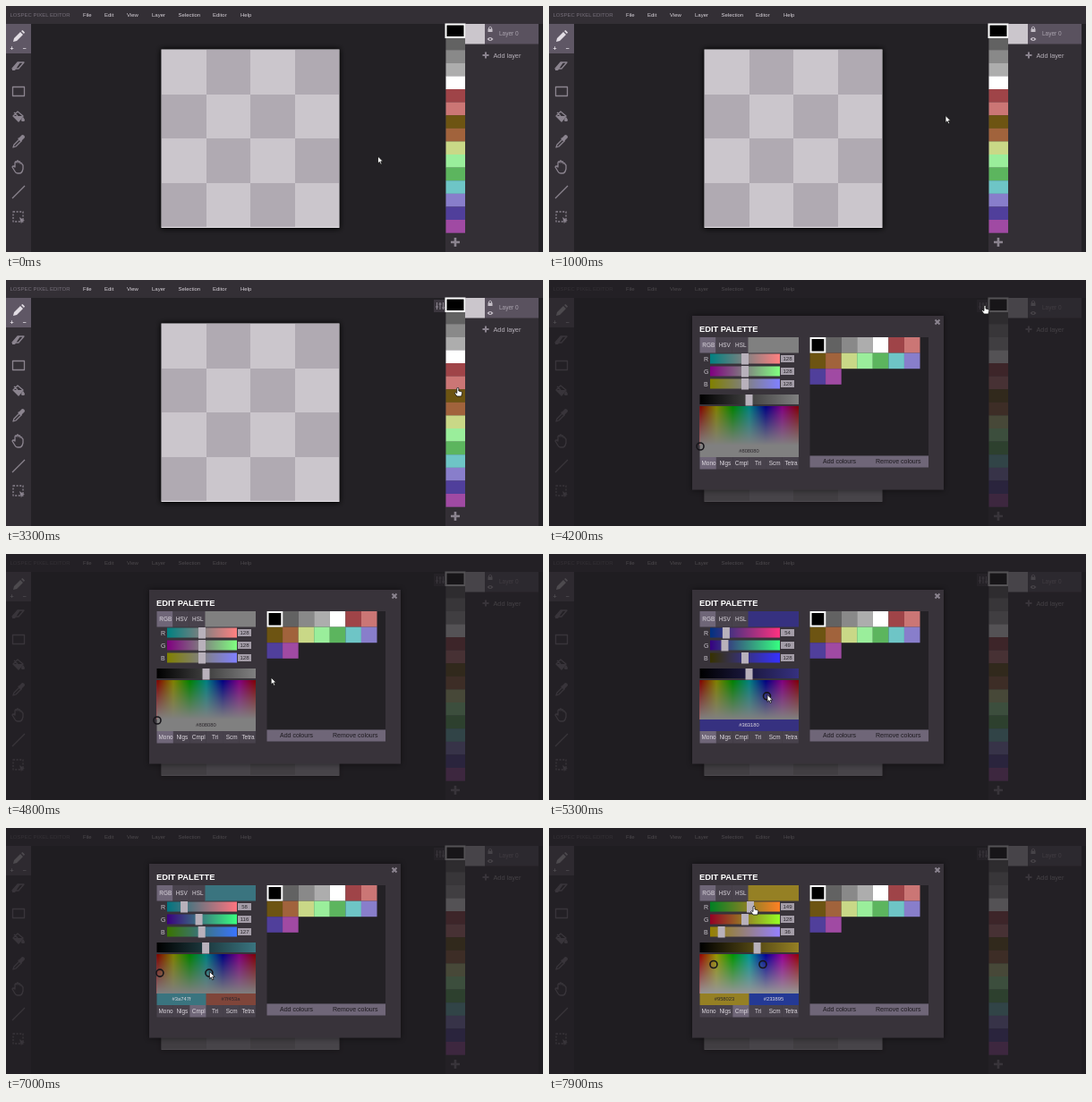
An HTML page that plays this animation: 600x275 px, repeating every 8 s.

```html
<!DOCTYPE html>
<html lang="en">
<head>
<meta charset="utf-8">
<title>Pixel editor palette</title>
<style>
  html, body { margin: 0; width: 100%; height: 100%; overflow: hidden; background: #232125; }
  svg { display: block; width: 600px; height: 275px; font-family: "Liberation Sans", Arial, sans-serif; }
  text { white-space: pre; }
  .icon { fill: none; stroke: #8b848f; stroke-width: 1.3; stroke-linejoin: round; }
  .solid { fill: #8b848f; }
  .mid { text-anchor: middle; }
</style>
</head>
<body>
<svg id="stage" viewBox="0 0 600 275"></svg>
<script>
const LOOP = 8000, STEP = 100, OPEN = 4100, COMPLEMENT = 6200, SLIDE = 7600;
const PANEL = '#332f35', DARK = '#232125', PURPLE = '#6f6678', LIGHT = '#cbc6cc';
const PALETTE = ['#000000', '#626262', '#898989', '#adadad', '#ffffff', '#9f4448', '#cb7675', '#6d5412',
  '#a1633c', '#c9d887', '#9aee9b', '#5cb55e', '#6ec5c6', '#887ecb', '#503f9b', '#a04aa3'];

// Markup helpers
const rect = (x, y, w, h, fill, extra = '') =>
  `<rect x="${x}" y="${y}" width="${w}" height="${h}" fill="${fill}" ${extra}/>`;
const text = (x, y, size, fill, label, extra = '') =>
  `<text x="${x}" y="${y}" font-size="${size}" fill="${fill}" ${extra}>${label}</text>`;
const path = (d, cls = 'icon', extra = '') => `<path d="${d}" class="${cls}" ${extra}/>`;
const gradient = (id, colors, extra = '') => `<linearGradient id="${id}" ${extra}>` +
  colors.map((c, i) => `<stop offset="${i / (colors.length - 1)}" stop-color="${c}"/>`).join('') +
  '</linearGradient>';
const list = (n, draw) => Array.from({ length: n }, (_, i) => draw(i)).join('');
const plus = (x, y, r, w) => path(`M${x - r} ${y}h${2 * r}M${x} ${y - r}v${2 * r}`, 'icon', `style="stroke-width:${w}"`);

const defs = `<defs>
  ${['r', 'g', 'b', 'v'].map(id => gradient('grad-' + id, ['#000', '#000'])).join('')}
  ${gradient('hues', ['#f00', '#ff0', '#0f0', '#0ff', '#00f', '#f0f', '#f00'])}
  <linearGradient id="fade" x2="0" y2="1"><stop stop-color="#fff" stop-opacity="0"/><stop offset="1" stop-color="#fff"/></linearGradient>
  <filter id="blur" x="-20%" y="-20%" width="140%" height="140%"><feGaussianBlur stdDeviation="3"/></filter>
</defs>`;

const menu = rect(0, 0, 600, 20, PANEL) + text(4.5, 12.3, 6, '#77707b', 'LOSPEC PIXEL EDITOR') +
  [['File', 86], ['Edit', 110], ['View', 135], ['Layer', 163], ['Selection', 192.5], ['Editor', 231], ['Help', 262]]
    .map(([label, x]) => text(x, 12.2, 6, '#d8d3da', label)).join('');

const tools = rect(0, 20, 28, 255, PANEL) + rect(0, 20, 28, 33, '#5f5765') +
  path('M8 40l1-4 7-7 3 3-7 7zM17 28l1.500-1 2.500 2.500-1 1.500z', '', 'fill="#e2dde4"') +
  text(4.500, 50, 7, '#e2dde4', '+', 'font-weight="bold"') + text(18.500, 50, 7, '#e2dde4', '−', 'font-weight="bold"') +
  path('M7 70l6-7h7l-6 7z') + path('M7 70l6-7h3l-6 9h-3z', 'solid') +
  path('M7.500 90.500h13v10h-13z') +
  path('M8 123l5-5 6 5-5 6zM9 119l4 4') + path('M8 123h11l-5 6zM19 124q4 5 0 5t0-5', 'solid') +
  path('M8 158l1-3 6-6 2 2-6 6z') + path('M13 148l2-1 3-3q3 0 3 3l-3 3-1 2z', 'solid') +
  path('M10 185l-3-5q1-2 3 0v-5q1-2 2 0v-1q1-2 2 0v1q1-2 2 0v1q2-1 2 1l1 1v4q-1 5-4 5h-2q-2 0-3-2z') +
  path('M7 215L21 201') +
  path('M8 230h11v11h-11z', 'icon', 'stroke-dasharray="2 1.6"') + path('M15 236l6 4-3 .5-1 3z', 'solid');

const board = rect(173, 48, 200, 201, '#000', 'filter="url(#blur)"') + rect(173.500, 48.500, 199, 199.500, '#e4e0e5') +
  list(16, i => {
    const col = i % 4, row = i >> 2;
    return rect(174 + col * 49.5, 49 + row * 49.5, 49.5, 49.5, (col + row) % 2 ? '#b0aab2' : LIGHT, 'shape-rendering="crispEdges"');
  });

const editButton = `<g id="edit">${rect(478, 22, 14, 14, '#3b363e')}` +
  path('M481.500 25v8M485 25v8M488.500 25v8M480 30h3M483.500 27h3M487 31h3', 'icon', 'style="stroke-width:1"') + '</g>';
const side = editButton + rect(491, 20, 109, 255, PANEL) + rect(595, 20, 5, 255, DARK) +
  PALETTE.map((c, i) => rect(491.5, 20 + i * 14.6, 21.5, 14.7, c)).join('') +
  rect(491.500, 20.500, 21, 14.500, '#000', 'stroke="#fff" stroke-width="2"') + plus(502, 264, 5, 2.6) +
  rect(513, 20, 22, 22.5, LIGHT) + rect(535, 20, 60, 22.5, '#5a525f') +
  rect(538.500, 25.500, 5, 3.500, '#c5bfc8') + path('M539.500 26v-2q1.500-2 3 0v2', 'icon', 'style="stroke:#c5bfc8;stroke-width:.9"') +
  path('M537.500 37q3.500-4 7 0q-3.500 4-7 0z', '', 'fill="#c5bfc8"') + '<circle cx="541" cy="37" r="1.100" fill="#5a525f"/>' +
  text(551, 33.3, 6.5, '#aaa3ae', 'Layer 0') + plus(536, 55, 3.5, 2) + text(544.5, 57.7, 7.3, '#b5afb8', 'Add layer');

const tabs = (labels, x, y, h, w, id) => labels.map((label, i) =>
  rect(x + i * w, y, w, h, '#48424c', `id="${id}${i}"`) + text(x + i * w + w / 2 + .8, y + h / 2 + 2.4, 6.4, '#dcd7de', label, 'class="mid"')).join('');
const sliders = ['r', 'g', 'b'].map((c, i) => {
  const y = 88 + i * 14;
  return text(173, y + 2.6, 7, '#c9c4cc', c.toUpperCase()) + rect(180, y - 5.5, 78, 11, `url(#grad-${c})`) +
    rect(0, y - 6, 8, 12.5, '#b8b1bb', `id="knob-${c}"`) + rect(259, y - 4, 15, 8, '#a49da8') +
    text(266.5, y + 2.2, 6, '#2a272c', '', `class="mid" id="num-${c}"`);
}).join('');
const picker = rect(222, 64, 57, 17.500, '#000', 'id="swatch"') + tabs(['RGB', 'HSV', 'HSL'], 168.5, 64, 17.5, 18, 'model') +
  sliders + rect(168.500, 128, 110.500, 11, 'url(#grad-v)') + rect(0, 128, 8, 12.500, '#b8b1bb', 'id="knob-v"') +
  rect(168.500, 141, 110.500, 44, 'url(#hues)') + rect(168.500, 141, 110.500, 44, 'url(#fade)') + rect(168.500, 141, 110.500, 44, '#000', 'id="shade"') +
  ['a', 'b'].map(k => rect(168.5, 185, 110.5, 13, '#000', `id="band-${k}"`) +
    text(0, 193.2, 5.8, '#fff', '', `class="mid" id="hex-${k}"`)).join('') +
  tabs(['Mono', 'Nlgs', 'Cmpl', 'Tri', 'Scm', 'Tetra'], 168.5, 198, 13.5, 18.4, 'scheme') +
  ['b', 'a'].map(k => `<circle id="ring-${k}" r="4" fill="none" stroke="#17151a" stroke-width="1.600"/>`).join('');

const modal = `<g id="modal">${rect(0, 0, 600, 275, 'rgb(31,28,32)', 'opacity=".76"')}` +
  rect(160, 40, 281, 195, '#111', 'filter="url(#blur)" opacity=".5"') + rect(160, 40, 281, 194.500, '#38333a') +
  text(168, 57.7, 9.3, '#fff', 'EDIT PALETTE', 'font-weight="bold"') +
  path('M431.500 44.500l5 5m0-5l-5 5', 'icon', 'style="stroke-width:2"') + picker +
  rect(291.500, 64, 132.500, 132.500, DARK) +
  PALETTE.map((c, i) => rect(291.5 + i % 7 * 17.57, 64 + (i / 7 | 0) * 17.6, 17.6, 17.6, c)).join('') +
  rect(292.500, 65, 15.800, 15.600, '#000', 'stroke="#fff" stroke-width="2"') + rect(291.500, 196.500, 132.500, 13, PURPLE) +
  text(306, 205.4, 7, '#1d1a1f', 'Add colours') + text(365, 205.4, 7, '#1d1a1f', 'Remove colours') + '</g>';

const cursor = `<g id="cursor" stroke="#111" stroke-width=".8" fill="#fff" stroke-linejoin="round">` +
  '<path id="arrow" d="M0 0v8l1.900-1.700 1.300 2.900 1.400-.6-1.300-2.800h2.500z"/>' +
  '<path id="hand" d="M-1 1q1-2 2 0v3l3 .8q1 .3 .8 1.500l-.8 3.700h-5l-2.500-3.500q.5-1.500 2.500 0z"/></g>';

document.getElementById('stage').innerHTML =
  defs + rect(0, 0, 600, 275, DARK) + board + menu + tools + side + modal + cursor;

const els = Object.fromEntries([...document.querySelectorAll('[id]')].map(el => [el.id, el]));
const set = (id, attrs) => Object.entries(attrs).forEach(([k, v]) => els[id].setAttribute(k, v));
const show = (id, on) => set(id, { visibility: on ? 'visible' : 'hidden' });

// Colour maths, channels 0..255
function toHsv([r, g, b]) {
  const max = Math.max(r, g, b), d = max - Math.min(r, g, b);
  const h = !d ? 0 : max === r ? (g - b) / d : max === g ? 2 + (b - r) / d : 4 + (r - g) / d;
  return [(h * 60 + 360) % 360, max && d / max, max / 255];
}
const toRgb = ([h, s, v]) => [5, 3, 1].map(n => {
  const k = (n + h / 60) % 6;
  return 255 * v * (1 - s * Math.max(0, Math.min(k, 4 - k, 1)));
});
const css = c => `rgb(${c.map(Math.round)})`;
const hex = c => '#' + c.map(v => Math.floor(v + .05).toString(16).padStart(2, '0')).join('');

// Keys are [time, ...values], linear between them
function track(keys, t) {
  const i = keys.findIndex(k => k[0] > t);
  if (i < 1) return keys.at(i).slice(1);
  const [a, b] = [keys[i - 1], keys[i]], p = (t - a[0]) / (b[0] - a[0]);
  return a.slice(1).map((v, n) => v + (b[n + 1] - v) * p);
}

const colors = [
  [0, 128, 128, 128], [4899, 128, 128, 128], [4900, 128, 70, 128], [5300, 54, 49, 128],
  [5500, 45, 60, 128], [5800, 68, 28, 127], [6699, 68, 28, 127], [6700, 70, 50, 127],
  [7000, 58, 116, 127], [7200, 45, 128, 70], [7400, 100, 128, 35.6]
].map(([t, ...c]) => [t, ...toHsv(c)]);
const moves = [
  [0, 415.5, 168], [100, 415.5, 168], [500, 428, 150], [800, 428, 150], [1200, 458, 95], [1400, 458, 95],
  [1800, 502, 42], [2000, 505, 36], [2300, 505, 42], [2700, 506, 100], [3000, 506, 150], [3200, 506, 140],
  [3700, 500, 40], [4000, 487, 28], [4300, 487, 28], [4900, 258, 160], [5800, 249, 151], [6100, 218, 204.5],
  [6300, 218, 204.5], [6700, 245, 156], [7400, 192, 152], [7600, 215, 87], [7900, 229, 87]
];
const spot = ([h, s]) => [169 + h / 360 * 110, 142 + (1 - s) * 44];

function drawPicker(t) {
  const slid = Math.min(1, Math.max(0, (t - SLIDE) / 300));
  const hsv = t < SLIDE ? track(colors, t) : toHsv([100 + 49 * slid, 128, 35.6]);
  const rgb = toRgb(hsv), pair = t >= COMPLEMENT;
  const other = [(hsv[0] + 180) % 360, hsv[1], hsv[2]];
  const stops = (id, from, to) => [from, to].forEach((c, i) => els['grad-' + id].children[i].setAttribute('stop-color', css(c)));

  ['r', 'g', 'b'].forEach((c, i) => {
    stops(c, rgb.map((v, n) => n === i ? 0 : v), rgb.map((v, n) => n === i ? 255 : v));
    set('knob-' + c, { x: 178.5 + rgb[i] * .285 });
    els['num-' + c].textContent = Math.round(rgb[i]);
  });
  stops('v', [0, 0, 0], rgb);
  set('knob-v', { x: 164.3 + 110 * hsv[2] });
  set('swatch', { fill: css(rgb) });
  set('shade', { opacity: 1 - hsv[2] });

  [['a', hsv, pair ? 196 : 223.5], ['b', other, 251]].forEach(([k, c, x]) => {
    const value = toRgb(c), [cx, cy] = spot(c);
    set('band-' + k, { fill: css(value), x: k === 'b' ? 223.5 : 168.5, width: pair ? 55.5 : 110.5 });
    set('hex-' + k, { x, fill: value[2] > value[0] + 1 ? '#ddd8df' : '#2b272c' });
    els['hex-' + k].textContent = hex(value);
    set('ring-' + k, { cx, cy });
  });
  ['band-b', 'hex-b', 'ring-b'].forEach(id => els[id].style.display = pair ? '' : 'none');

  set('model0', { fill: PURPLE });
  set('scheme0', { fill: pair ? '#48424c' : PURPLE });
  set('scheme2', { fill: pair || t >= 6000 ? PURPLE : '#48424c' });
  return spot(hsv);
}

function draw(t) {
  els.modal.style.display = t >= OPEN ? '' : 'none';
  show('edit', t >= 1800);
  const ring = drawPicker(t);
  const dragging = t >= 4900 && t <= 5800 || t >= 6700 && t <= 7400;
  const [x, y] = dragging ? [ring[0] + .5, ring[1] - 1.5] : track(moves, t);
  const hand = t >= 1800 && t < 4500 || t >= 6000 && t < 6500 || t >= 7500;
  set('cursor', { transform: `translate(${x} ${y})` });
  show('arrow', !hand);
  show('hand', hand);
}

const start = performance.now();
function tick() {
  const t = (performance.now() - start) % LOOP;
  draw(Math.floor(t / STEP) * STEP);
  requestAnimationFrame(tick);
}
tick();
</script>
</body>
</html>
```
